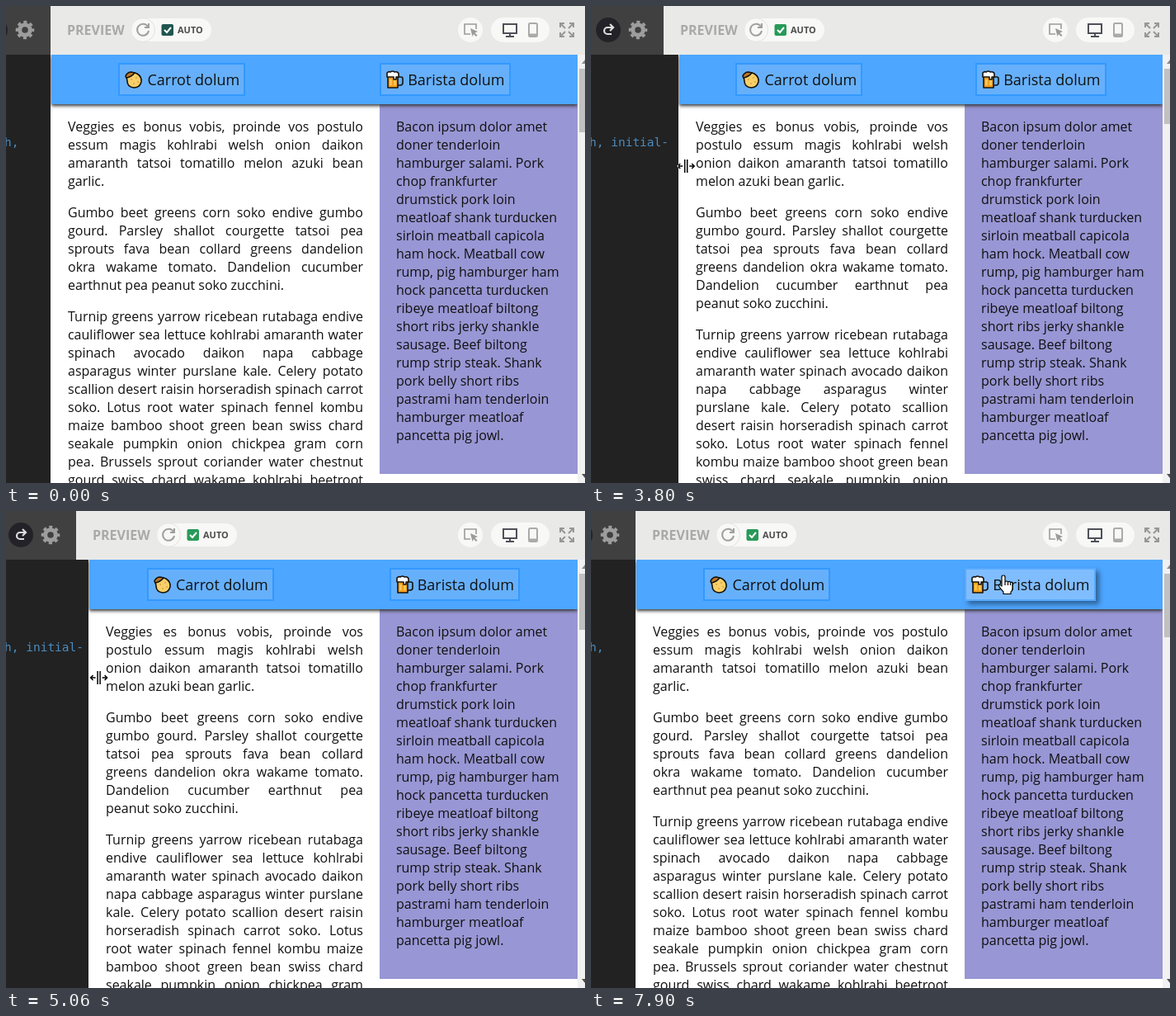
Recreate the animation shown at these times as an HTML page. Size 702x578 px, loop 8000 ms.

```html
<!DOCTYPE html>
<html lang="en">
<head>
<meta charset="utf-8">
<title>Resizable preview</title>
<style>
html, body { margin: 0; width: 100%; height: 100%; overflow: hidden; background: #222; }
#stage { --p: 55; position: absolute; left: 0; top: 0; width: 702px; height: 578px; overflow: hidden;
  background: #222; font: 16px/22px "Open Sans", sans-serif; color: #111; cursor: default; isolation: isolate; }
#code { position: absolute; left: -2px; top: 154px; white-space: pre; color: #4b8cc0;
  font: 14.5px/22px "DejaVu Sans Mono", monospace; }
#panel { position: absolute; left: calc(var(--p) * 1px - 1px); right: 0; top: 59px; bottom: 0;
  overflow: hidden; background: #fff; }
header { position: absolute; left: 1px; right: 9px; top: 0; height: 60px; background: #4da6ff;
  box-shadow: 0 2px 4px #333; display: flex; justify-content: space-around; align-items: center; }
.link { display: flex; align-items: center; gap: 5px; box-sizing: border-box; height: 40px; padding: 0 5px;
  border: 2px solid #3399ff; background: #66b0fb; font-size: 18px; white-space: nowrap; }
.link.on { background: #80bdff; border-color: #58aaff; box-shadow: 4px 4px 6px rgba(0, 0, 0, .42); }
.link svg { flex: none; }
article { position: absolute; left: 21px; right: 269px; top: 76px; text-align: justify; }
p { margin: 0 0 16px; }
aside { position: absolute; right: 9px; top: 60px; width: 240px; height: 448px; background: #9896d4; }
aside p { position: absolute; left: 20px; top: 16px; white-space: pre; }
#bar { position: absolute; right: 0; top: 0; bottom: 0; width: 9px; background: #f1f1f1; }
#thumb { position: absolute; left: 2px; right: 0; top: 17px; background: #c1c1c1;
  height: calc(77px + (55 - var(--p)) * .19px); }
#bar i { position: absolute; left: 5px; border: 4px solid transparent; }
#bar .up { top: 2px; border-bottom: 5px solid #8a8a8a; }
#bar .down { bottom: 2px; border-top: 5px solid #505050; }
#tools, #pointer { position: absolute; left: 0; top: 0; overflow: visible; }
#pointer.invert { mix-blend-mode: difference; }
svg text { font-family: "Open Sans", sans-serif; }
</style>
</head>
<body>
<div id="stage">
  <div id="code">h,</div>
  <div id="panel">
    <article>
      <p>Veggies es bonus vobis, proinde vos postulo essum magis kohlrabi welsh onion daikon amaranth tatsoi tomatillo melon azuki bean garlic.</p>
      <p>Gumbo beet greens corn soko endive gumbo gourd. Parsley shallot courgette tatsoi pea sprouts fava bean collard greens dandelion okra wakame tomato. Dandelion cucumber earthnut pea peanut soko zucchini.</p>
      <p>Turnip greens yarrow ricebean rutabaga endive cauliflower sea lettuce kohlrabi amaranth water spinach avocado daikon napa cabbage asparagus winter purslane kale. Celery potato scallion desert raisin horseradish spinach carrot soko. Lotus root water spinach fennel kombu maize bamboo shoot green bean swiss chard seakale pumpkin onion chickpea gram corn pea. Brussels sprout coriander water chestnut gourd swiss chard wakame kohlrabi beetroot carrot watercress. Corn amaranth salsify bunya nuts nori azuki bean chickweed potato bell pepper artichoke.</p>
    </article>
    <aside><p>Bacon ipsum dolor amet
doner tenderloin
hamburger salami. Pork
chop frankfurter
drumstick pork loin
meatloaf shank turducken
sirloin meatball capicola
ham hock. Meatball cow
rump, pig hamburger ham
hock pancetta turducken
ribeye meatloaf biltong
short ribs jerky shankle
sausage. Beef biltong
rump strip steak. Shank
pork belly short ribs
pastrami ham tenderloin
hamburger meatloaf
pancetta pig jowl.</p></aside>
    <header>
      <div class="link">
        <svg width="23" height="24" viewBox="0 0 23 24" stroke="#16120c" stroke-width="1.6" stroke-linecap="round">
          <path d="M3 8Q9 2 16 5Q22 9 21 15Q19 22 12 22Q4 21 4 14Z" fill="#f8cf68"/>
          <path d="M2 8Q4 3 9 3L13 4Q9 9 3 10Z" fill="#b9772b"/>
          <path d="M9 12h.1M15 10h.1M12 17h.1M17 15h.1" stroke="#c98a2e"/>
        </svg>
        <span>Carrot dolum</span>
      </div>
      <div class="link">
        <svg width="22" height="24" viewBox="0 0 22 24" stroke="#16120c" stroke-width="1.6" stroke-linejoin="round">
          <path d="M15 9h4q2 0 2 2v5q0 3-3 3h-3" fill="none"/>
          <path d="M3 7h12v15H3z" fill="#f5a11c"/>
          <path d="M6.500 12v7M11.500 12v7" stroke="#ffd166" stroke-width="2"/>
          <path d="M2 9V4q2-2 4-1 3-2 5 0 4-1 5 2v4h-3v3h-3V9z" fill="#fff"/>
        </svg>
        <span>Barista dolum</span>
      </div>
    </header>
    <div id="bar"><i class="up"></i><div id="thumb"></div><i class="down"></i></div>
  </div>

  <svg id="tools" width="702" height="59">
    <rect width="702" height="59" fill="#404040"/>
    <g id="slide">
      <rect width="800" height="59" fill="#e9e9e8"/>
      <rect x="-178" y="14" width="90" height="30" rx="15" fill="#222"/>
      <text x="-139" y="34.500" font-size="16" fill="#d4d4d4">Undo</text>
      <circle cx="-67" cy="29" r="15" fill="#222228"/>
      <path d="M-62 26h-6a4 4 0 0 0 0 8h5M-65 22l4 4-4 4" fill="none" stroke="#ddd" stroke-width="2.200"/>
      <g transform="translate(-31 29)" fill="none" stroke="#9d9d9d">
        <circle r="6.300" stroke-width="5"/>
        <circle r="9.500" stroke-width="3.600" stroke-dasharray="4 3.460" stroke-dashoffset="2"/>
      </g>
      <text x="20" y="34.500" font-size="16" font-weight="700" fill="#a9a9a9">PREVIEW</text>
      <rect x="97" y="15" width="98" height="28" rx="14" fill="#f8f8f6"/>
      <circle cx="112" cy="29" r="14.500" fill="#f8f8f6" stroke="#e2e2e0"/>
      <path d="M118 25a7 7 0 1 0 1 5M119 21v5h-5" fill="none" stroke="#a0a0a0" stroke-width="2"/>
      <rect id="check" x="134.500" y="22" width="14.500" height="14" rx="2"/>
      <path d="M138 29l3 3 5-6" fill="none" stroke="#fff" stroke-width="2"/>
      <text x="154" y="33" font-size="11" font-weight="700" fill="#4c4c4c">AUTO</text>
    </g>
    <g fill="#f8f8f6">
      <circle cx="563" cy="29" r="15"/>
      <rect x="588" y="14" width="71" height="30" rx="15"/>
    </g>
    <path d="M563 34h-7V22h14v6" fill="none" stroke="#9b9b9b" stroke-width="1.600"/>
    <path d="M563 27l9 4-3.500 1.500 3 3-1.500 1.500-3-3-1.500 3z" fill="#9b9b9b"/>
    <path d="M603 22h16v11h-16zM611 33v4M606 37h10" fill="none" stroke="#4f5058" stroke-width="2"/>
    <rect x="634" y="21" width="10" height="16" rx="1.500" fill="none" stroke="#aaa" stroke-width="2"/>
    <path d="M634 35h10" stroke="#aaa" stroke-width="3"/>
    <path d="M672 26v-5h5M683 21h5v5M688 32v5h-5M677 37h-5v-5M672 21l6 6M688 21l-6 6M688 37l-6-6M672 37l6-6"
      fill="none" stroke="#979797" stroke-width="2"/>
  </svg>

  <svg id="pointer" width="1" height="1">
    <path data-kind="arrow" d="M0 0v16l4-3.500 2.500 6 2.500-1-2.500-6H12z" fill="#fff" stroke="#000"/>
    <path data-kind="text" d="M-3-8h2l1 1 1-1h2M0-7V7M-3 8h2l1-1 1 1h2" fill="none" stroke="#222"/>
    <path data-kind="hand" fill="#fff" stroke="#000" stroke-width="1.200" stroke-linejoin="round"
      d="M-2 13V2q0-2 2-2t2 2v6q2-2 3.500 0 2-1.500 3 .5 2.500-1 2.500 1.500v6q0 3-2 4v2.500H0V20q-3-3-5.500-7 0-3 3.500 0zM2 8v4M5.500 8.500V12M8.500 9v3"/>
    <path data-kind="resize" fill="none" stroke="#fff" stroke-width="1.500"
      d="M-1.500-8V8M1.500-8V8M-4 0h-6M-7-3l-3 3 3 3M4 0h6M7-3l3 3-3 3"/>
  </svg>
</div>
<script>
const LOOP = 8000;

// bursts of screen updates: first time, last time, count
const bursts = [
  [180, 680, 7], [830, 1230, 6], [1530, 1960, 6], [2110, 2340, 4], [2670, 2670, 1], [2990, 3070, 2],
  [3640, 4260, 9], [4360, 4430, 2], [4500, 4580, 2], [4800, 5430, 9], [5510, 5580, 2],
  [5830, 6630, 11], [6730, 6970, 4], [7200, 7270, 2], [7520, 7900, 6]
];

// time, pointer x, pointer y
const path = [
  [180, 556, 565], [340, 480, 330], [500, 330, 160], [600, 230, 108], [680, 205, 85],
  [830, 240, 86], [1060, 420, 84], [1150, 485, 78], [1230, 492, 72],
  [1530, 470, 75], [1730, 300, 80], [1960, 208, 88],
  [2110, 190, 95], [2190, 130, 125], [2340, 55, 196], [3070, 55.500, 194],
  [3640, 64, 194], [3870, 140, 194], [4020, 170, 192], [4110, 165, 192], [4182, 138, 192], [4260, 102.500, 192],
  [4360, 62, 196], [4430, 40, 200], [4500, 33, 202], [4580, 31.500, 202],
  [4800, 38, 202], [5030, 112, 202], [5200, 128, 201], [5350, 92, 200], [5430, 68.500, 200], [5580, 55.500, 200],
  [5830, 72, 195], [5990, 240, 185], [6150, 430, 120], [6230, 470, 48], [6310, 585, 24],
  [6390, 588, 26], [6470, 500, 40], [6550, 430, 80], [6630, 388, 110],
  [6730, 370, 108], [6890, 235, 90], [6970, 206, 82], [7270, 205, 83],
  [7520, 225, 86], [7670, 350, 88], [7820, 470, 82], [7900, 500, 78]
];

// time, page edge, toolbar edge; both trail the pointer
const drag = [
  [3560, 55, 54], [3640, 58, 54], [3870, 130, 105], [4020, 166, 158], [4110, 170, 170],
  [4182, 148, 160], [4260, 113, 140], [4360, 75, 95], [4430, 48, 58], [4500, 35, 38], [4580, 31, 30],
  [4720, 31, 30], [4800, 34, 31], [5030, 100, 84], [5200, 126, 122], [5350, 108, 118],
  [5430, 82, 88], [5510, 62, 66], [5580, 55, 54]
];

const $ = id => document.getElementById(id);
const stage = $("stage"), pointer = $("pointer");
const links = [...document.querySelectorAll(".link")];
const shapes = [...pointer.children];

function snap(t) {
  let last = 0;
  for (const [from, to, count] of bursts) {
    if (t < from) break;
    const gap = (to - from) / (count - 1) || 1;
    last = from + Math.min(count - 1, Math.floor((t - from) / gap + 1e-6)) * gap;
  }
  return last;
}

function sample(keys, t) {
  if (t <= keys[0][0]) return keys[0].slice(1);
  const i = keys.findIndex(k => k[0] >= t);
  if (i < 0) return keys[keys.length - 1].slice(1);
  const a = keys[i - 1], b = keys[i], f = (t - a[0]) / (b[0] - a[0]);
  return a.slice(1).map((v, j) => v + (b[j + 1] - v) * f);
}

function inside(el, x, y) {
  const r = el.getBoundingClientRect();
  return x >= r.left && x <= r.right && y >= r.top && y <= r.bottom;
}

function kindAt(t, x, y, over) {
  if (t < 180) return "none";
  if (t > 2339 && t < 5829) return "resize";
  if (over) return "hand";
  return y > 132 ? "text" : "arrow";
}

function draw(t) {
  t = snap(t);
  const [x, y] = sample(path, t);
  const [page, tool] = sample(drag, t).map(Math.round);
  stage.style.setProperty("--p", page);
  $("slide").setAttribute("transform", `translate(${tool} 0)`);
  $("check").setAttribute("fill", t < 3640 ? "#20564f" : "#289a58");
  $("code").textContent = page > 98 ? "h, initial-" : "h,";

  const free = t >= 180 && !(t > 2339 && t < 5829);
  const over = links.map(el => free && inside(el, x, y));
  links.forEach((el, i) => el.classList.toggle("on", over[i]));
  const kind = kindAt(t, x, y, over.includes(true));
  shapes.forEach(s => { s.style.display = s.dataset.kind === kind ? "" : "none"; });
  pointer.classList.toggle("invert", kind === "resize");
  pointer.style.transform = `translate(${x}px, ${y}px)`;
}

const start = performance.now();
function tick() {
  draw((performance.now() - start) % LOOP);
  requestAnimationFrame(tick);
}
tick();
</script>
</body>
</html>
```
